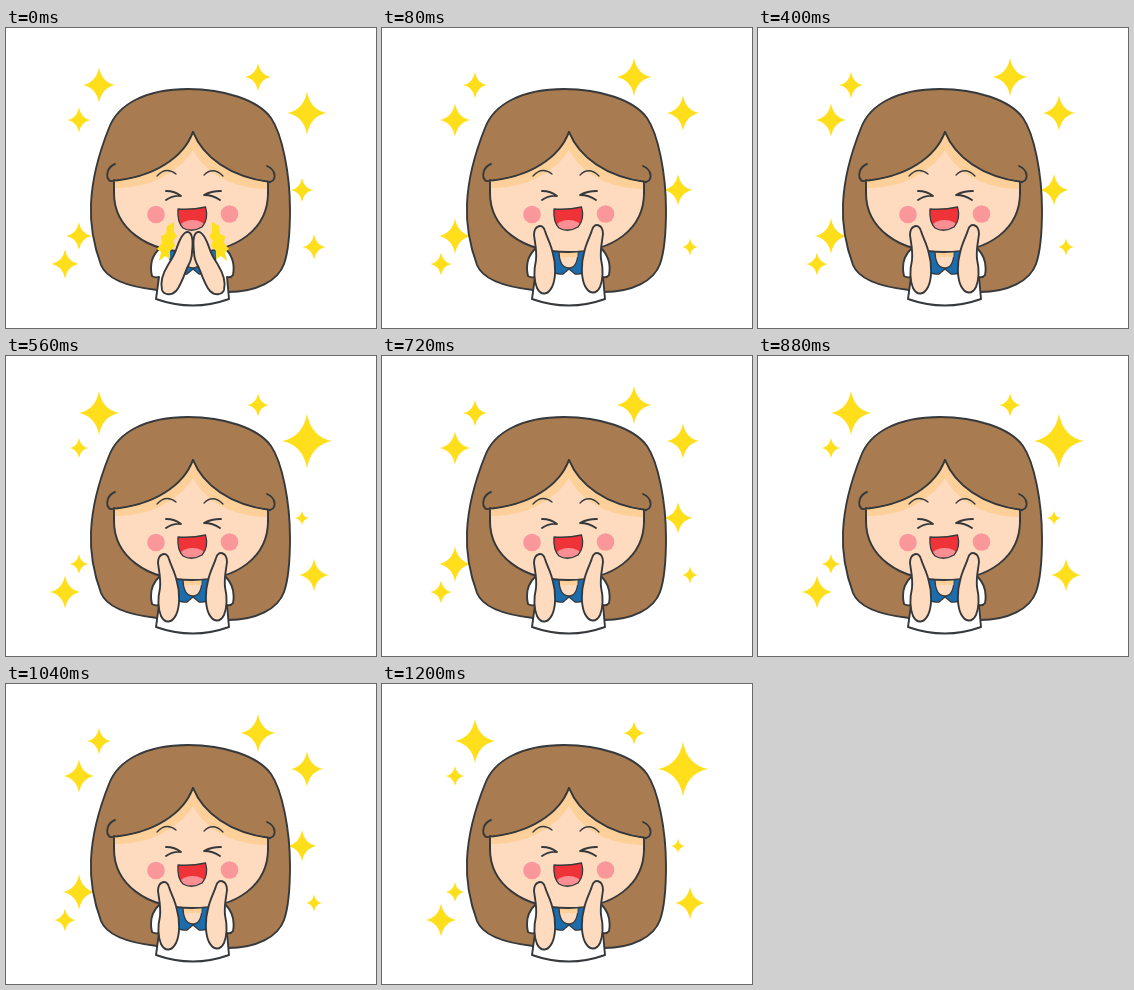
An HTML page that plays this animation: 370x300 px, repeating every 1.28 s.

```html
<!DOCTYPE html>
<html lang="en">
<head>
<meta charset="utf-8">
<title>Clapping girl</title>
<style>
html, body { margin: 0; width: 100%; height: 100%; overflow: hidden; background: #fff; }
svg { display: block; width: 100vw; height: 100vh; }
.line { stroke: #36393c; stroke-width: 1.9; stroke-linecap: round; stroke-linejoin: round; }
.thin { stroke-width: 1.3; }
.none { fill: none; }
.hair { fill: #a87b50; }
.skin { fill: #fedabf; }
.shade { fill: #fdd09a; }
.white { fill: #fff; }
.blue { fill: #1c6dae; }
.yellow { fill: #ffdf1b; }
</style>
</head>
<body>
<svg viewBox="0 0 370 300">
  <defs>
    <path id="mouth" d="M172 181Q186 182 199.500 179Q203 191 196 199Q186 205 177 200Q171 194 172 181Z"/>
    <clipPath id="mouthClip"><use href="#mouth"/></clipPath>
    <path id="openHand" d="M152 207C152 197 161 195 163 203C165 210 169 216 171 226C174 236 174 251 170 259C166 267 159 268 155 260C151 250 152 241 154 232C155 223 153 215 152 207Z"/>
    <path id="closedHand" d="M170 222C173 213 177 203 182 204C187 205 187 215 186 224C186 231 184 235 181 240C178 248 174 259 170 263C165 268 158 267 156 262C154 254 157 245 162 237C165 232 168 228 170 222Z"/>
    <path id="splash" class="yellow" d="M168 194L168 204L171 208L167 213L169 218L164 223L164 231L159 228L153 233L155 224L151 221L156 215L155 208L160 206L161 198Z"/>
  </defs>

  <g id="stars" class="yellow"></g>

  <path class="line hair" d="M151 262C124 259 101 252 95 237C88 218 84 197 85 176C86 150 93 125 103 100C112 76 140 61 182 61C218 61 252 72 265 90C276 106 284 145 284 182C284 205 283 222 278 236C272 253 250 264 222 264Z"/>

  <path class="line white" d="M154 220Q142 231 146 248Q149 250 153 249L150 271Q187 284 223 271L221 249Q225 250 227 247Q230 231 219 220Z"/>
  <path class="line thin blue" d="M160 222L168 241Q173 247 181 246L187 241L193 246Q201 247 206 241L213 222Z"/>
  <path class="line thin skin" d="M177 222C177 236 182 240 187 240C192 240 196 236 196 222Z"/>
  <path class="shade" d="M178 222H195.500V229H178Z"/>

  <path class="line skin" d="M187 104C178 129 148 150 108 153V165C108 200 140 224 186 224C232 224 262 200 262 165V154C224 149 197 129 187 104Z"/>
  <path class="shade" d="M187 104C178 129 148 150 108 153V160C140 161 172 146 187 122C200 146 228 161 262 161V154C224 149 197 129 187 104Z"/>
  <path class="line none" d="M109 136C101 139 99 149 104 153C148 150 178 129 187 104C197 129 224 149 264 154C271 152 270 142 261 138M108 152V166M262 154V166"/>

  <g class="line none">
    <path class="thin" d="M151 148Q160 138 170 146M198 147Q207 138 217 148"/>
    <path d="M160 163Q169 163 175 168Q167 167 160 172M215 163Q205 163 198 167Q207 167 214 172"/>
  </g>
  <g fill="#f9979a">
    <circle cx="150" cy="186.500" r="8.800"/>
    <circle cx="223.500" cy="186" r="8.800"/>
  </g>
  <g clip-path="url(#mouthClip)">
    <path fill="#f03338" d="M170 176H204V206H170Z"/>
    <ellipse cx="186.500" cy="200" rx="13" ry="8" fill="#f98f93"/>
  </g>
  <use href="#mouth" class="line thin none"/>

  <g id="open" class="line skin">
    <use href="#openHand"/>
    <use href="#openHand" transform="matrix(-1 0 0 1 373 -1)"/>
  </g>
  <g id="closed">
    <use href="#splash"/>
    <use href="#splash" transform="matrix(-1 0 0 1 374 0)"/>
    <g class="line skin">
      <use href="#closedHand"/>
      <use href="#closedHand" transform="matrix(-1 0 0 1 374 0)"/>
    </g>
  </g>
</svg>
<script>
const STEP = 80;
const byId = id => document.getElementById(id);

// x, y, then the radius at each of the three twinkle levels
const stars = [
  [93, 57, 12.5, 17, 21], [301, 85, 17, 20.5, 26],
  [59, 236, 11, 14, 16], [308, 219, 8, 12, 15.5],
  [73, 92, 16, 12, 9.5], [252, 49, 18, 13, 11],
  [296, 162, 15, 11.5, 7], [73, 208, 17, 13, 9.5]
];
const levels = [1, 0, 1, 2];

const starPaths = stars.map(() => {
  const path = document.createElementNS("http://www.w3.org/2000/svg", "path");
  return byId("stars").appendChild(path);
});

function starShape(x, y, r) {
  const w = r * 0.96, h = r * 1.05, k = r * 0.16;
  return `M${x} ${y - h}Q${x + k} ${y - k} ${x + w} ${y}` +
    `Q${x + k} ${y + k} ${x} ${y + h}` +
    `Q${x - k} ${y + k} ${x - w} ${y}` +
    `Q${x - k} ${y - k} ${x} ${y - h}Z`;
}

function draw(time) {
  const beat = Math.floor(time / STEP) % 4;
  const isOpen = beat % 2 === 1;
  byId("open").style.display = isOpen ? "" : "none";
  byId("closed").style.display = isOpen ? "none" : "";
  stars.forEach(([x, y, ...radii], i) =>
    starPaths[i].setAttribute("d", starShape(x, y, radii[levels[beat]])));
}

const start = performance.now();
function tick() {
  draw(performance.now() - start);
  requestAnimationFrame(tick);
}
tick();
</script>
</body>
</html>
```
